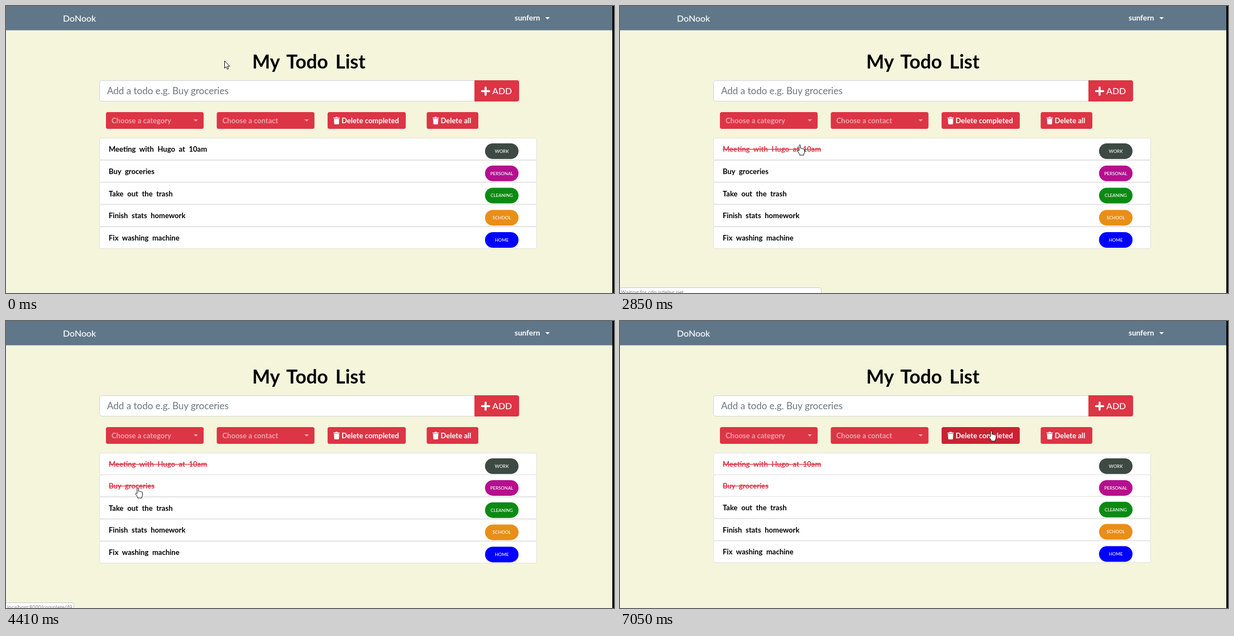
Animation, 1089 px wide and 514 px high, one loop 8000 ms. Source, as an HTML page:

```html
<!DOCTYPE html>
<html lang="en">
<head>
<meta charset="utf-8">
<title>Todo list</title>
<style>
  html, body { margin: 0; width: 100%; height: 100%; overflow: hidden; background: #f5f5dc; }
  svg { display: block; width: 1089px; height: 514px; font: 700 13px Lato, "Open Sans", sans-serif; }
  .red { fill: #dc3545; }
  .red.hover { fill: #c82333; }
  .white { fill: #fff; }
  .pale { fill: #fff; fill-opacity: .55; }
  .row rect { fill: #fff; stroke: #dfdfdf; }
  .row .task { word-spacing: 3.5px; }
  .row .struck { fill: #dc3545; text-decoration: line-through; }
  .row .badge { stroke: none; }
  .row .tag { font-size: 8px; font-weight: 500; fill: #fff; text-anchor: middle; }
  #status text { font: 9px "Open Sans", sans-serif; fill: #777; }
  #pointer path { fill: #fff; stroke: #111; stroke-linejoin: round; }
</style>
</head>
<body>
<svg viewBox="0 0 1089 514">
  <defs>
    <path id="caret" d="M0 0h8l-4 4z"/>
    <path id="trash" d="M0 1.2h3.4l.7-1.2h3l.7 1.2h3.4v1.6H0zM.8 3.6h9.6l-.6 8.8q-.1 1-1.1 1H2.5q-1 0-1.1-1z"/>
  </defs>
  <rect width="1089" height="514" fill="#f5f5dc"/>
  <rect width="1086" height="43.5" fill="#607789"/>
  <g class="white">
    <text x="102" y="28" font-size="16" font-weight="500">DoNook</text>
    <text x="911" y="26" font-size="13.5">sunfern</text>
    <use href="#caret" x="966" y="20"/>
  </g>
  <text x="441" y="112" font-size="34" word-spacing="5">My Todo List</text>

  <rect x="167.5" y="133.5" width="674" height="37" rx="4" fill="#fff" stroke="#ced4da"/>
  <text x="181" y="158" font-size="17" font-weight="400" fill="#6c757d">Add a todo e.g. Buy groceries</text>
  <path class="red" d="M839 133h76q4 0 4 4v30q0 4-4 4h-76z"/>
  <path d="M859 146v13M852.5 152.5h13" stroke="#fff" stroke-width="3.6" stroke-linecap="round"/>
  <text class="white" x="871" y="158" font-size="16" font-weight="500">ADD</text>

  <g id="buttons"></g>
  <g id="rows"></g>

  <g id="status">
    <rect x="-1.5" y="504.5" height="20" rx="3" fill="#fff" stroke="#c8c8c8"/>
    <text x="2" y="516"></text>
  </g>
  <rect x="1086" width="3" height="514"/>
  <circle id="click" r="9.5" fill="#ff0" fill-opacity=".47"/>
  <g id="pointer">
    <path d="M.5.5v13l3-2.8 2 4.6 2.2-1-2-4.4h4z"/>
    <path d="M-1.2 10V1.2q0-1.4 1.3-1.4t1.3 1.4V6q1-.8 2.3.5 1-.7 2.2.5 2.3-.5 2.6 1.6v4q0 2-1.4 3.4v2H-.2v-1.6l-3.6-5q-.5-1.6.8-1.8z"/>
    <path d="M-2.5-5H-.8L0-4.5.8-5h1.7M0-4.5v9M-2.5 5H-.8L0 4.5.8 5h1.7" style="fill:none;stroke:#333"/>
  </g>
</svg>
<script>
const $ = id => document.getElementById(id);
const LOOP = 8000, LOADED = [3090, 5500];

// x, width, label, kind
const buttons = [
  [179, 175, 'Choose a category', 'select'],
  [377.5, 175, 'Choose a contact', 'select'],
  [576, 140, 'Delete completed', 'trash'],
  [753.5, 92.5, 'Delete all', 'trash']
];
// label, label width, tag, tag colour
const tasks = [
  ['Meeting with Hugo at 10am', 170, 'WORK', '#3d4a43'],
  ['Buy groceries', 83, 'PERSONAL', '#b4108e'],
  ['Take out the trash', 118, 'CLEANING', '#0c8a14'],
  ['Finish stats homework', 137, 'SCHOOL', '#e78f17'],
  ['Fix washing machine', 124, 'HOME', '#0000ff']
];
// first step, last step, number of steps, x, y reached
const moves = [
  [0, 0, 1, 391, 98],
  [760, 920, 3, 388, 121],
  [1380, 1380, 1, 358, 184],
  [1460, 1930, 7, 322, 249],
  [3790, 4180, 6, 236, 299],
  [5650, 5650, 1, 234.5, 302],
  [6520, 7050, 8, 665, 197]
];
const waiting = 'Waiting for cdn.jsdelivr.net...';
const link = id => 'localhost:8000/complete/' + id;
// start, text, width
const statuses = [
  [0, '', 0], [2070, link(48), 122], [2690, waiting, 361], [3400, '', 0],
  [4340, link(49), 122], [5270, waiting, 361], [5570, '', 0]
];

$('buttons').innerHTML = buttons.map(([x, w, label, kind]) => `
  <rect class="red" x="${x}" y="190" width="${w}" height="30" rx="3.5"/>` + (kind == 'select'
  ? `<g class="pale"><text x="${x + 10}" y="210">${label}</text>
     <use href="#caret" x="${x + 157}" y="203"/></g>`
  : `<g class="white"><use href="#trash" x="${x + 10.5}" y="198.5"/>
     <text x="${x + 25}" y="210">${label}</text></g>`)).join('');

$('rows').innerHTML = tasks.map(([label, , tag, color]) => `
  <g class="row">
    <rect x="167.5" width="783" height="39" rx="2.5"/>
    <text class="task" x="184" y="24.5">${label}</text>
    <rect class="badge" x="858" y="9.5" width="60" height="28" rx="14" style="fill:${color}"/>
    <text class="tag" x="888" y="26.4">${tag}</text>
  </g>`).join('');

const buttonRects = [...$('buttons').querySelectorAll('rect')];
const rows = [...$('rows').children];
const cursors = [...$('pointer').children];
const [statusBox, statusText] = $('status').children;

function pointerAt(t) {
  let x = 391, y = 98;
  for (const [start, end, steps, toX, toY] of moves) {
    if (t < start) break;
    const gap = (end - start) / (steps - 1) || 1;
    const p = Math.min(1, (Math.floor((t - start) / gap + 1e-6) + 1) / steps);
    x += (toX - x) * p;
    y += (toY - y) * p;
  }
  return [x, y];
}

const show = (el, on) => el.setAttribute('visibility', on ? 'visible' : 'hidden');
const place = (el, x, y) => el.setAttribute('transform', `translate(${x} ${y})`);

function draw(t) {
  const [x, y] = pointerAt(t);
  const over = (left, top, w, h) => x >= left && x <= left + w && y >= top && y <= top + h;
  let hand = false;

  buttons.forEach(([left, w], i) => {
    const hover = over(left, 190, w, 30);
    buttonRects[i].classList.toggle('hover', hover);
    hand ||= hover;
  });

  let top = 236.5;
  tasks.forEach(([, w], i) => {
    const done = t >= LOADED[i];
    const hover = over(184, top + 11, w, 17);
    place(rows[i], 0, top);
    rows[i].children[1].classList.toggle('struck', done || hover);
    hand ||= hover;
    top += done ? 38.9 : 39.75;
  });

  const [, text, width] = statuses.findLast(s => t >= s[0]);
  show($('status'), text);
  statusBox.setAttribute('width', width + 1);
  statusText.textContent = text;

  const beam = t >= 5650 && t < 6520;
  const shape = beam ? 2 : hand ? 1 : 0;
  cursors.forEach((c, i) => show(c, i == shape));
  place($('pointer'), x, y);
  place($('click'), x, y);
  show($('click'), [2380, 4980].some(c => t >= c && t < c + 65));
}

const origin = performance.now();
function tick() {
  draw((performance.now() - origin) % LOOP);
  requestAnimationFrame(tick);
}
tick();
</script>
</body>
</html>
```
